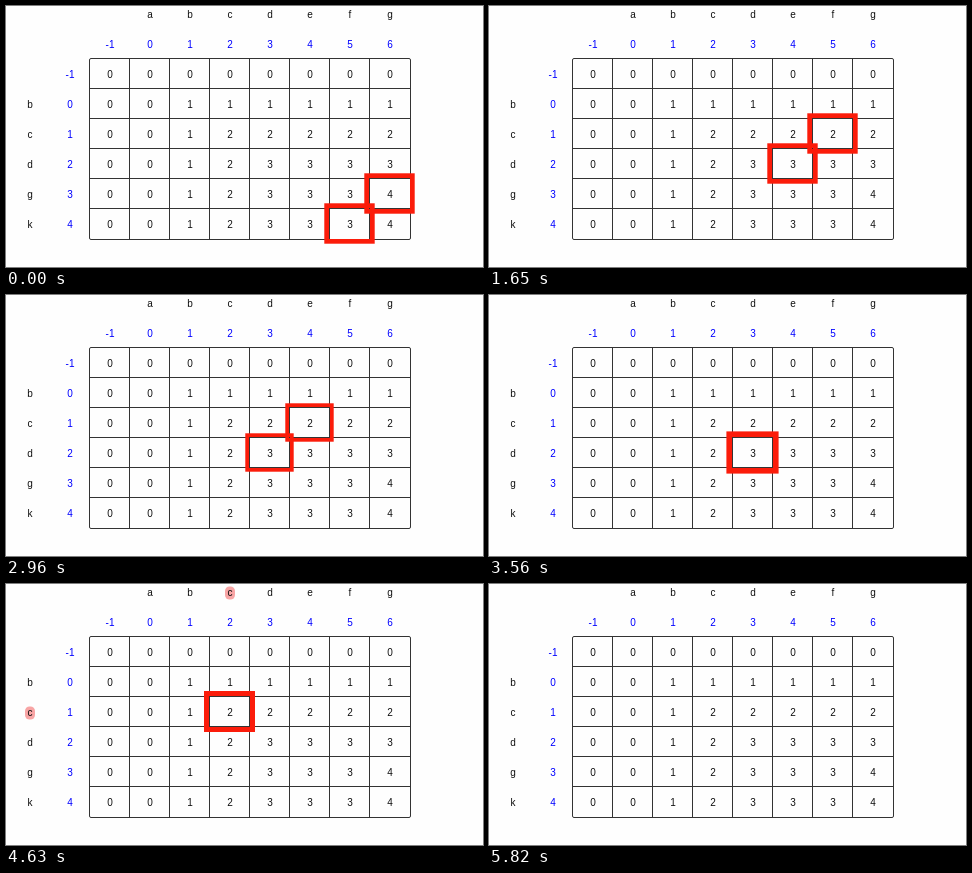
Write an HTML page that moves like this. It is 477 px wide and 261 px high and loops after 6310 ms.

```html
<!DOCTYPE html>
<html lang="en">
<head>
<meta charset="utf-8">
<title>Longest common subsequence</title>
<style>
  html, body { margin: 0; width: 100%; height: 100%; overflow: hidden; background: #fefefe; }
  svg { display: block; width: 100vw; height: 100vh; }
  text { font: 10px "Liberation Sans", Arial, sans-serif; text-anchor: middle; fill: #111; }
  .index { fill: #00f; }
  .grid { fill: none; stroke: #333; stroke-width: 1; }
  .box { fill: none; stroke: #fb1c0a; }
  .mark { fill: #f8a5a5; }
</style>
</head>
<body>
<svg viewBox="0 0 477 261">
  <g id="marks"></g>
  <g id="table"></g>
  <g id="boxes"></g>
</svg>
<script>
const LOOP = 6310, STEP = 118.65, LEAD = 16, LAST = 49;
const across = "abcdefg", down = "bcdgk";
const colX = c => 104 + 40 * c;
const baseY = r => 72 + 30 * r;

function add(parent, tag, attrs, content) {
  const el = document.createElementNS("http://www.w3.org/2000/svg", tag);
  for (const k in attrs) el.setAttribute(k, attrs[k]);
  if (content !== undefined) el.textContent = content;
  document.getElementById(parent).appendChild(el);
  return el;
}
const label = (x, y, s, cls = "") => add("table", "text", { x, y, class: cls }, s);
const show = (el, on) => el.setAttribute("visibility", on ? "visible" : "hidden");

// Table: row and column 0 stand for index -1
let lines = "";
for (let c = 1; c < 8; c++) lines += `M${83.5 + 40 * c} 53V233`;
for (let r = 1; r < 6; r++) lines += `M83.5 ${52.5 + 30 * r}H404.5`;
add("table", "path", { d: lines, class: "grid" });
add("table", "rect", { x: 83.5, y: 52.5, width: 321, height: 181, rx: 1.5, class: "grid" });

const lcs = [];
for (let r = 0; r <= down.length; r++) {
  lcs.push([]);
  label(64, baseY(r), r - 1, "index");
  if (r) label(24, baseY(r), down[r - 1]);
  for (let c = 0; c <= across.length; c++) {
    lcs[r][c] = !r || !c ? 0
      : down[r - 1] === across[c - 1] ? lcs[r - 1][c - 1] + 1
      : Math.max(lcs[r - 1][c], lcs[r][c - 1]);
    label(colX(c), baseY(r), lcs[r][c]);
    if (!r) {
      label(colX(c), 42, c - 1, "index");
      if (c) label(colX(c), 12, across[c - 1]);
    }
  }
}

// Cell visits: start, end, step where the letters light up, row, column
const visits = [
  [6, 9, 7, 4, 7], [10, 14, 11, 3, 6], [19, 24, 20, 3, 5],
  [29, 33, 31, 3, 4], [33, 40, 37, 2, 3], [40, 47, 44, 1, 2]
];
// Neighbour comparisons: start, end, row, column
const compares = [[0, 6, 5, 7], [14, 19, 3, 6], [24, 29, 3, 5]];
// Matched letters leaving their row: start, row
const flights = [[9, 4], [32.95, 3], [39.5, 2], [46.1, 1]];
const visitPulse = [4, 5.6, 6.7, 3.7, 5, 7, 5];
const comparePulse = [4.7, 3.7, 4.5, 5.3, 5.3, 4.5];

const boxes = [0, 1].map(() => add("boxes", "rect", { class: "box" }));
const marks = [0, 1].map(() => add("marks", "rect", { class: "mark", width: 10, height: 13, rx: 4.5 }));
const flyer = add("table", "text", { class: "index" });

function placeBox(el, r, c, w) {
  el.setAttribute("x", 83 + 40 * c - w / 2);
  el.setAttribute("y", 52 + 30 * r - w / 2);
  el.setAttribute("width", 41 + w);
  el.setAttribute("height", 31 + w);
  el.setAttribute("stroke-width", w);
  show(el, true);
}

function placeMark(el, x, y) {
  el.setAttribute("x", x - 5);
  el.setAttribute("y", y - 9.5);
  show(el, true);
}

function draw(n) {
  [...boxes, ...marks, flyer].forEach(el => show(el, false));

  for (const [from, to, lit, r, c] of visits) {
    if (n < from || n >= to) continue;
    placeBox(boxes[0], r, c, visitPulse[n - from]);
    if (n >= lit) {
      placeMark(marks[0], colX(c), 12);
      placeMark(marks[1], 24, baseY(r));
    }
  }
  for (const [from, to, r, c] of compares) {
    if (n < from || n >= to) continue;
    const w = comparePulse[n - from];
    placeBox(boxes[0], r - 1, c, w);
    placeBox(boxes[1], r, c - 1, w);
  }
  for (const [from, r] of flights) {
    const p = (n - from) / 3;
    if (p < 0 || p > 0.9) continue;
    flyer.textContent = down[r - 1];
    flyer.setAttribute("x", 24 + 16 * p);
    flyer.setAttribute("y", baseY(r) + (30 - baseY(r)) * p);
    show(flyer, true);
  }
}

const origin = performance.now();
function tick() {
  const t = (performance.now() - origin) % LOOP;
  draw(Math.min(LAST, Math.floor((t + LEAD) / STEP)));
  requestAnimationFrame(tick);
}
tick();
</script>
</body>
</html>
```
